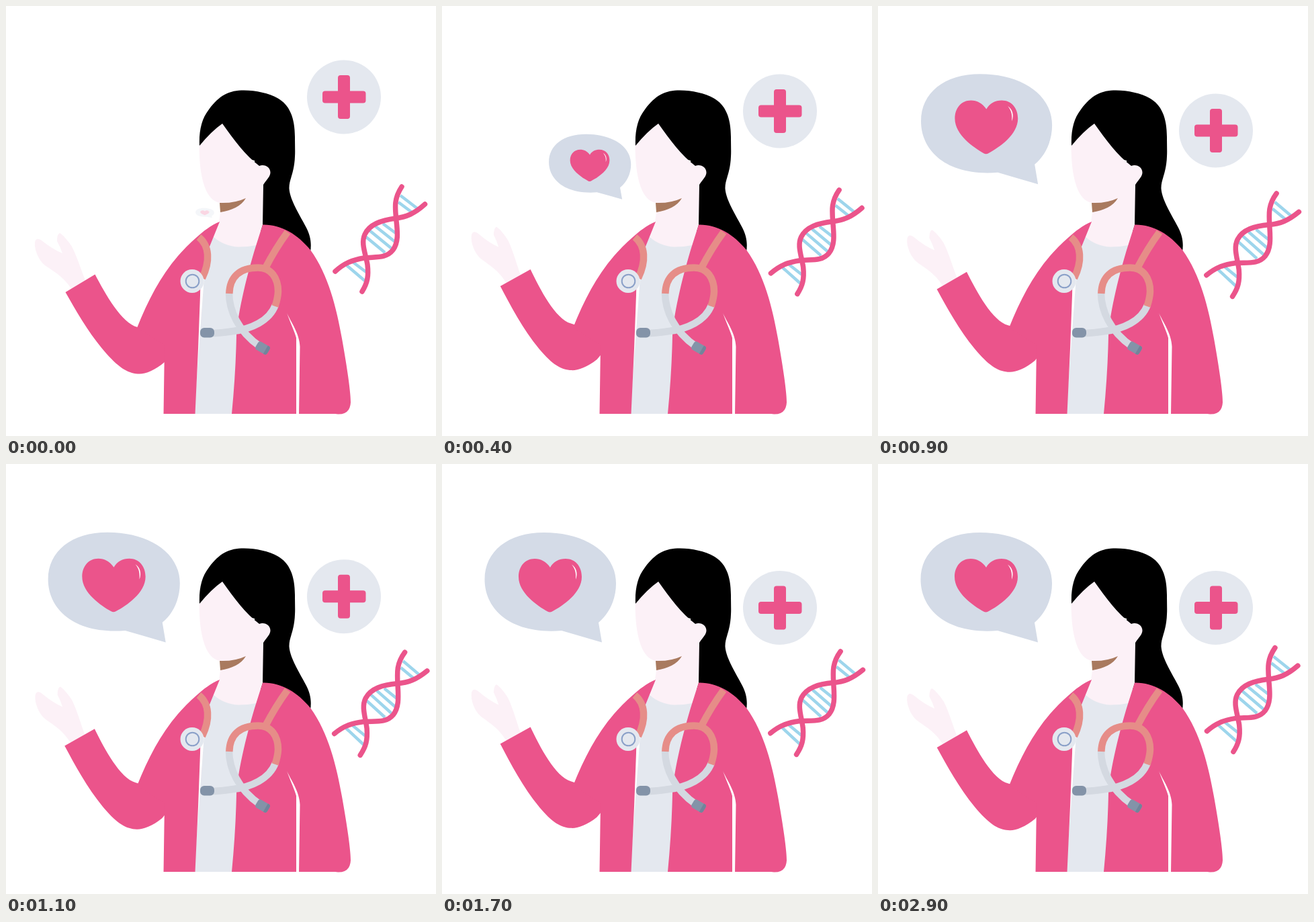
Write an HTML page that moves like this. It is 640 px wide and 640 px high and loops after 3000 ms.

```html
<!DOCTYPE html>
<html lang="en">
<head>
<meta charset="utf-8">
<title>Doctor</title>
<style>
  html, body { margin: 0; width: 100%; height: 100%; overflow: hidden; background: #fff; }
  svg { display: block; width: 100%; height: 100%; }
  .pink { fill: #eb548b; }
  .skin { fill: #fcf1f7; }
  .pale { fill: #e4e8ef; }
  .cap { fill: #8393a8; }
  .tube { fill: none; stroke-width: 10.5; }
  .coral { stroke: #e68d88; }
  .grey { stroke: #d4d9e1; }
</style>
</head>
<body>
<svg viewBox="0 0 640 640">
  <!-- hair, head and neck -->
  <path d="M288 209C287 186 291 168 302 154C318 132 333 125.500 354 125.500C372 125.500 392 130 404 137C422 147 430 166 430 195C430 205 430.500 218 430 224C429 250 421 258 421.500 272C423 290 438 312 447 330C453 342 455 352 453 366L370 345V230Z"/>
  <path class="pale" d="M300 335H390L350 607H280Z"/>
  <path class="skin" d="M287.500 208.500Q306 186 322 175C340 200 356 222 377 238C385 235 393.500 240 393.500 248C393 255 387 259 383 266L382 326L373 356Q360 358.500 346 358.500Q325 358 308 343L317 322L319 307V293C299 290 288 262 287.500 208.500Z"/>
  <path fill="#a97a5f" d="M318 293Q340 294 357 286C350 298 336 304 319 307Z"/>

  <!-- raised arm -->
  <g id="arm">
    <path class="skin" d="M98 422C85 402 72 396 58 386C48 378 42 362 43 352C44 345 49 346 53 349Q69 362 84 368Q81 359 76 350Q76 339 80 338C84 340 93 350 98 358C107 376 112 394 118 408Z"/>
    <path class="pink" d="M88.500 426L132.500 399.500C148 429 172 472 195.500 478L206 481L260 470V500L236 530C222 542 208 547.500 199 547.500C183 547.500 170 540 150 518C125 490 105 455 88.500 426Z"/>
  </g>

  <!-- jacket -->
  <path class="pink" d="M318 321C304 327 294 335 284 344C242 380 217 424 195 479L236 505L234.500 607H281.500L286 510L289 430C289 405 295 380 303 358Z"/>
  <path class="pink" d="M382 325.500C410 325 434 340 453 363C480 400 492 450 500 495C508 540 513 575 513 590Q512 608 494 607.500L490 607H336Q342 545 343 490C345 455 360 395 372 357Z"/>
  <path fill="#fff" d="M418 457C424 473 430 486 432 494V608H436L437.500 507C437 488 424 470 418 457Z"/>

  <!-- stethoscope -->
  <path class="tube coral" stroke-width="9" d="M287 344C303 357 304 380 292 405"/>
  <circle class="pale" cx="277" cy="409.500" r="17.500"/>
  <circle cx="277.500" cy="409.500" r="9.800" fill="none" stroke="#8aa0c8" stroke-width="2"/>
  <path class="tube grey" d="M332 427C332 452 345 485 380 508"/>
  <path class="tube grey" d="M401 445C392 469 364 481 338 484Q320 487 304 487"/>
  <path class="tube coral" d="M419 336.500Q401 361 386 390"/>
  <path class="tube coral" d="M332.300 428C333 404 347 389.500 375 389.500C395 389.500 405 405 405 425Q404.500 435 400.500 447"/>
  <rect class="cap" x="289" y="479" width="21" height="14.500" rx="6"/>
  <g transform="rotate(30 382 509)">
    <rect class="cap" x="372" y="502" width="20" height="14" rx="4"/>
    <path fill="#72849b" d="M387 502h2q3 0 3 4v6q0 4-3 4h-2z"/>
  </g>

  <g id="badge">
    <circle class="pale" cx="503" cy="135.500" r="55"/>
    <rect class="pink" x="471" y="126.500" width="64.500" height="18" rx="4"/>
    <rect class="pink" x="494" y="103" width="18" height="65" rx="4"/>
  </g>

  <g id="dna" fill="none">
    <path stroke="#9dd5ec" stroke-width="4.500" d="M587 282L613 302M584 292L604 307M561 324L580 338M550 328L579 351M541 334L574 361M535 343L564 367M516 381L536 396M507 386L534 409"/>
    <g stroke="#eb548b" stroke-width="7.500" stroke-linecap="round">
      <path d="M589 269C577 287 579 300 581 320C583 338 584 352 576 363C566 376 550 373 533 375C515 378 503 383 490 395"/>
      <path d="M623.500 295C608 309 596 314 580 316C558 319 541 325 534 340C528 353 535 368 538 385C540 402 538 412 530 425"/>
    </g>
  </g>

  <g id="bubble">
    <path fill="#d4dbe7" d="M178 248L238 265.500L233 236C250 222 259 200 259 178C259 130 210 102 152 102C98 102 63.500 130 63.500 172C63.500 216 102 254 178 248Z"/>
    <path class="pink" d="M161 154C155 145 147 141 138 141C124 141 114 152 114 168C114 192 142 211 157 219.500Q160.500 221.500 164 219.500C180 211 208 192 208 168C208 152 198 141 184 141C174 141 166 145 161 154Z"/>
    <path fill="#fff" d="M193 149.500C200 154 202.500 163 199 172C199.500 163 199 157 193 149.500Z"/>
  </g>
</svg>
<script>
  const LOOP = 3000, STEP = 100;
  const PIVOT = '354 371';        // shared by the arm and the helix
  const ANCHOR = [318.4, 320];    // the speech bubble grows from here

  // Each key is [time in ms, value]
  const keys = {
    armTurn: [[40, 0], [400, .75], [520, 1], [600, .96], [900, .375], [960, .33], [1200, .67], [1400, 1], [2100, .5], [2350, .33]],
    dnaTurn: [[0, 0], [400, .38], [600, .54], [900, .77], [1350, 1], [1400, 1], [2100, .47], [2320, .35]],
    badgeDrop: [[40, 0], [1390, 78.5]],
    scaleX: [[40, .143], [400, .625], [600, .845], [700, .918], [800, .967], [900, .998], [1050, 1.004], [1350, 1]],
    scaleY: [[40, .088], [400, .593], [600, .865], [700, .935], [800, .98], [900, 1.003], [1350, 1]],
    fade: [[0, .23], [300, 1]]
  };

  function valueAt(track, t) {
    const next = track.findIndex(key => key[0] > t);
    if (next === 0) return track[0][1];
    if (next < 0) return track[track.length - 1][1];
    const [t0, v0] = track[next - 1], [t1, v1] = track[next];
    return v0 + (v1 - v0) * (t - t0) / (t1 - t0);
  }

  const part = id => document.getElementById(id);
  const [arm, dna, badge, bubble] = ['arm', 'dna', 'badge', 'bubble'].map(part);
  const move = (element, transform) => element.setAttribute('transform', transform);

  function draw(now) {
    const t = Math.floor(now % LOOP / STEP) * STEP;
    const at = name => valueAt(keys[name], t);
    const [x, y] = ANCHOR;
    move(arm, `rotate(${2.6 * at('armTurn')} ${PIVOT})`);
    move(dna, `rotate(${3.12 * at('dnaTurn')} ${PIVOT})`);
    move(badge, `translate(0 ${at('badgeDrop')})`);
    move(bubble, `translate(${x} ${y}) scale(${at('scaleX')} ${at('scaleY')}) translate(${-x} ${-y})`);
    bubble.setAttribute('opacity', at('fade'));
  }

  const start = performance.now();
  function tick() {
    draw(performance.now() - start);
    requestAnimationFrame(tick);
  }
  tick();
</script>
</body>
</html>
```
